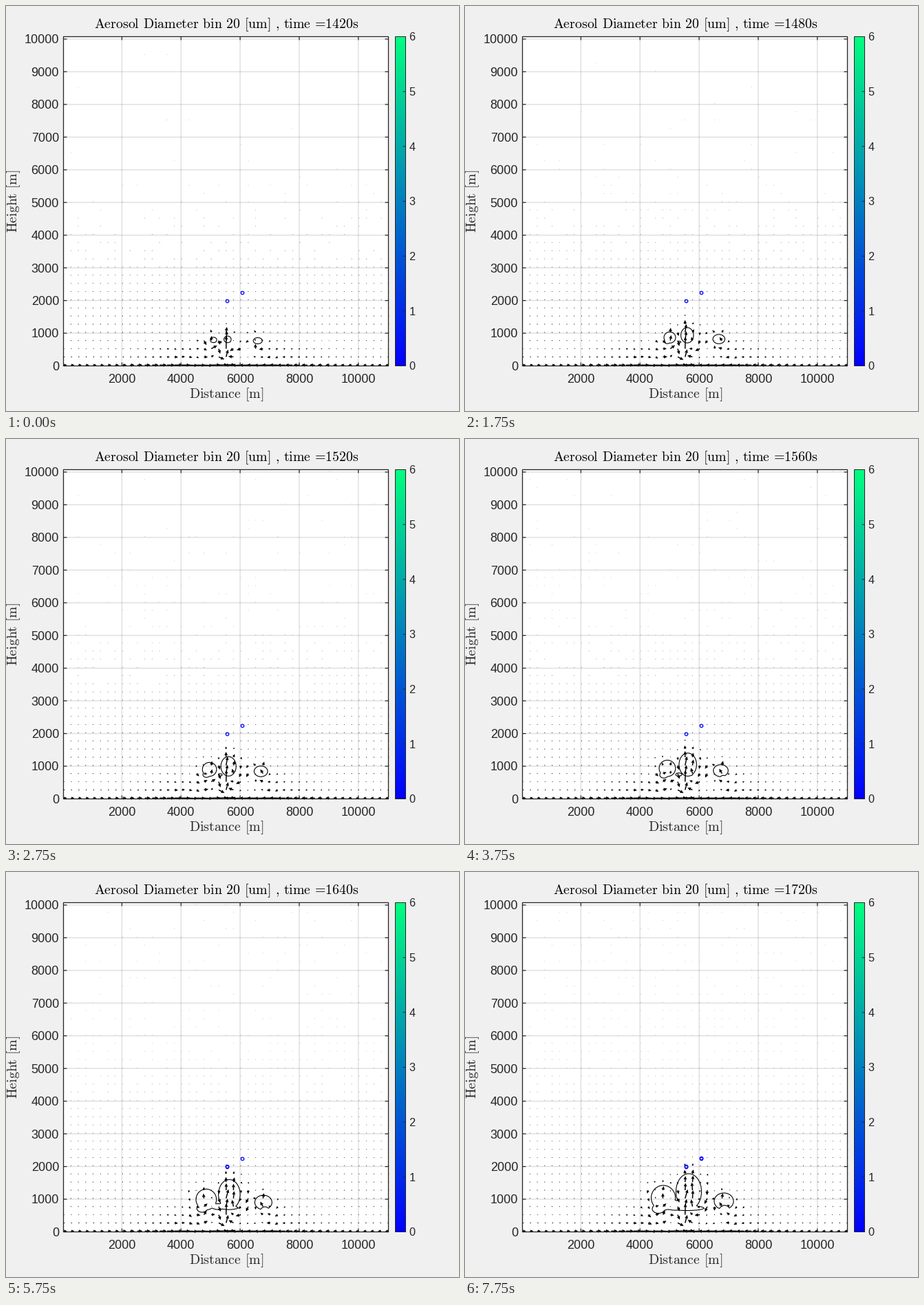
These frames come from a looping animation (658 by 588 pixels, 8 s). A matplotlib script:

```python
import numpy as np
import matplotlib as mpl
import matplotlib.pyplot as plt
from matplotlib.animation import FuncAnimation
from matplotlib.patches import Circle, Rectangle

W, H, DPI = 658, 588, 64
PX = 72 / DPI  # points per pixel
FRAMES, INTERVAL = 32, 250
INK = "#262626"
LEFT, RIGHT, TOP, BOTTOM = 83.5, 555.5, 44.5, 522.5
BAR_LEFT, BAR_RIGHT = 565.5, 580.5

mpl.rcParams["mathtext.fontset"] = "cm"
mpl.rcParams["font.family"] = "Liberation Sans"
mpl.rcParams["path.snap"] = False

fig = plt.figure(figsize=(W / DPI, H / DPI), dpi=DPI, facecolor="#f0f0f0")
ax = fig.add_axes([0, 0, 1, 1])
ax.set(xlim=(0, W), ylim=(H, 0))
ax.autoscale(False)
ax.axis("off")


def px_x(metres):
    return 82.5 + 0.04293 * metres


def px_y(metres):
    return 522.5 - 0.04745 * metres


def roman(text):
    text = text.replace(",", "{,}").replace("=", r"\hspace{-0.2}=\hspace{-0.2}")
    return r"$\mathrm{%s}$" % text.replace(" ", r"\hspace{0.38}")


def label(x, y, text, size, ha="center", color=INK, **kw):
    return ax.text(x, y, text, fontsize=size * PX, ha=ha, va="baseline",
                   color=color, **kw)


def line(x, y, width=1.2, **kw):
    ax.plot(x, y, color=INK, lw=width * PX, solid_capstyle="butt", **kw)


def box(x0, x1, **kw):
    ax.add_patch(Rectangle((x0, TOP), x1 - x0, BOTTOM - TOP, **kw))


def draw_axes():
    box(LEFT, RIGHT, fc="white", ec="none", zorder=0)
    for m in range(2000, 10001, 2000):
        x = px_x(m)
        line([x, x], [TOP, BOTTOM], 1.4, alpha=0.15, zorder=1)
        line([x, x], [BOTTOM, BOTTOM - 5], zorder=5)
        line([x, x], [TOP, TOP + 5], zorder=5)
        label(x, 547.3, str(m), 18)
    for m in range(0, 10001, 1000):
        y = px_y(m)
        if m:
            line([LEFT, RIGHT], [y, y], 1.4, alpha=0.15, zorder=1)
        line([LEFT, LEFT + 5], [y, y], zorder=5)
        line([RIGHT, RIGHT - 5], [y, y], zorder=5)
        label(77, y + 6.4, str(m), 18, ha="right")
    box(LEFT, RIGHT, fc="none", ec=INK, lw=1.3 * PX, zorder=5)
    label(319.7, 569, roman("Distance [m]"), 19.8)
    label(16.5, 283, roman("Height [m]"), 19.8, rotation=90, rotation_mode="anchor")


def draw_colorbar():
    ramp = np.linspace(0, 1, 256)
    colors = np.stack([0 * ramp, ramp, 1 - ramp / 2], axis=1)[:, None]
    ax.imshow(colors, extent=(BAR_LEFT, BAR_RIGHT, BOTTOM, TOP), origin="lower",
              aspect="auto", zorder=2)
    ax.set(xlim=(0, W), ylim=(H, 0))
    box(BAR_LEFT, BAR_RIGHT, fc="none", ec=INK, lw=PX, zorder=5)
    for value in range(7):
        y = BOTTOM + (TOP - BOTTOM) * value / 6
        line([BAR_RIGHT - 4, BAR_RIGHT], [y, y], 1, zorder=5)
        label(585.5, y + 5.8, str(value), 16.2, ha="left")


# Each ellipse is (x, y, half width, half height) at the start and end.
PLUMES = np.array([
    [(301.5, 484.8, 4.6, 3.9), (288, 473, 17.5, 18)],
    [(321.8, 484, 5.2, 4.8), (325, 464, 18.5, 26)],
    [(365.7, 486, 6.5, 4.5), (376, 478, 14, 12)],
])
TONGUE = np.array([(299, 486, 2, 2), (281, 489, 9, 6.5)])
BRIDGES = np.array([
    [(312, 488, 1, 1), (305, 484, 17, 7)],
    [(325, 487, 1, 1), (322, 488, 25, 3.5)],
])
NOTCH = np.array([(373, 496, 2, 2), (377, 492, 8, 8)])


def tween(pair, amount):
    return pair[..., 0, :] + amount * (pair[..., 1, :] - pair[..., 0, :])


def inside(ellipse, x, y):
    cx, cy, rx, ry = ellipse
    return 1 - ((x - cx) / rx) ** 2 - ((y - cy) / ry) ** 2


MAP_X, MAP_Y = np.meshgrid(np.arange(260, 400, 0.7), np.arange(430, 506, 0.7))


def cloud_field(progress):
    """Positive inside the clouds; the bridges join the two left ones late."""
    grown, late = progress ** 0.75, progress ** 2
    parts = [*tween(PLUMES, grown), tween(TONGUE, grown), *tween(BRIDGES, late)]
    union = np.logaddexp.reduce([12 * inside(p, MAP_X, MAP_Y) for p in parts])
    return np.minimum(union, -12 * inside(tween(NOTCH, grown), MAP_X, MAP_Y))


# Wind on a 250 m grid
gx, gz = (a.ravel() for a in np.meshgrid(25 + 250 * np.arange(45), 25 + 250 * np.arange(41)))
X, Y = px_x(gx), px_y(gz)
CENTRE = 322
GUST = np.random.RandomState(4).normal(0, 1.8, (2, gx.size))
PLUME_SPEEDS = 10, 14, 7


def updraft(cx, cy, speed, sx, sy):
    """Vortex pair: rising core, inflow below and outflow above."""
    dx, dz = X - cx, cy - Y
    bell = speed * np.exp(-(dx / sx) ** 2 - (dz / sy) ** 2)
    return np.array([2 * bell * dx * dz / sy**2, bell * (1 - 2 * (dx / sx) ** 2)])


def wind(progress):
    side = np.sign(CENTRE - X)
    reach = np.exp(-((X - CENTRE) / 125) ** 4)
    u = side * (2 + 1.3 * reach) * np.exp(-(gz - 275) / 900)
    flow = np.array([u, 0 * u])
    for (cx, cy, rx, ry), speed in zip(tween(PLUMES, progress ** 0.75), PLUME_SPEEDS):
        flow += updraft(cx, cy + 4, speed, 8 + 0.6 * rx, 12 + ry)
    flow += updraft(320, 502, 9, 11, 14)
    flow += updraft(CENTRE, 482, 1.6, 75, 32 + 10 * progress)
    near = np.exp(-((X - CENTRE) / 72) ** 4 - (gz / (1000 + 350 * progress)) ** 6)
    flow += GUST * near
    ground = gz < 100
    flow[0, ground] = (side * (5 + 8 * reach))[ground]
    flow[1, ground] = (0.4 * GUST[1] * near)[ground]
    return flow


def wind_colors(step, progress, length):
    rng = np.random.RandomState(100 + step)
    floor, spread = 2900 + 900 * progress, 1000 + 2000 * progress
    shown = rng.rand(gx.size) < 0.01 + np.exp(-np.maximum(gz - floor, 0) / spread)
    rgba = np.zeros((gx.size, 4))
    rgba[:, 3] = np.clip(1.6 * np.exp(-gz / 2800), 0.2, 1) * shown
    rgba[length > 2.2, 3] = 1
    return rgba


def ring(x, y):
    return ax.add_patch(Circle((x, y), 2.2, fc="none", ec="blue", lw=1.3 * PX, zorder=6))


draw_axes()
draw_colorbar()
title = label(319.7, 32, "", 19.8, color="black")
arrows = ax.quiver(X, Y, 0 * X, 0 * Y, units="dots", scale_units="dots", scale=1,
                   width=1.5, headwidth=3.3, headlength=3.4, headaxislength=3.2,
                   minshaft=1.2, minlength=0.85, zorder=4)
outlines = []
echoes = []
for x, y, onset in ((321.5, 428.5, 0.65), (343.5, 416.5, 0.8)):
    ring(x, y)
    echoes.append((ring(x, y - 0.8), onset))


def update(k):
    step = max(0, k - 1)
    progress = step / (FRAMES - 2)
    title.set_text(roman(f"Aerosol Diameter bin 20 [um] , time ={1420 + 10 * step}s"))
    for old in outlines:
        old.remove()
    outlines[:] = [ax.contour(MAP_X, MAP_Y, cloud_field(progress), levels=[0],
                              colors="black", linewidths=1.1 * PX, zorder=3)]
    u, v = wind(progress)
    arrows.set_UVC(u, v)
    arrows.set_facecolor(wind_colors(step, progress, np.hypot(u, v)))
    for echo, onset in echoes:
        echo.set_visible(progress > onset)
    return [title, arrows]


anim = FuncAnimation(fig, update, frames=FRAMES, interval=INTERVAL, repeat=True, repeat_delay=0)
plt.show()
```
